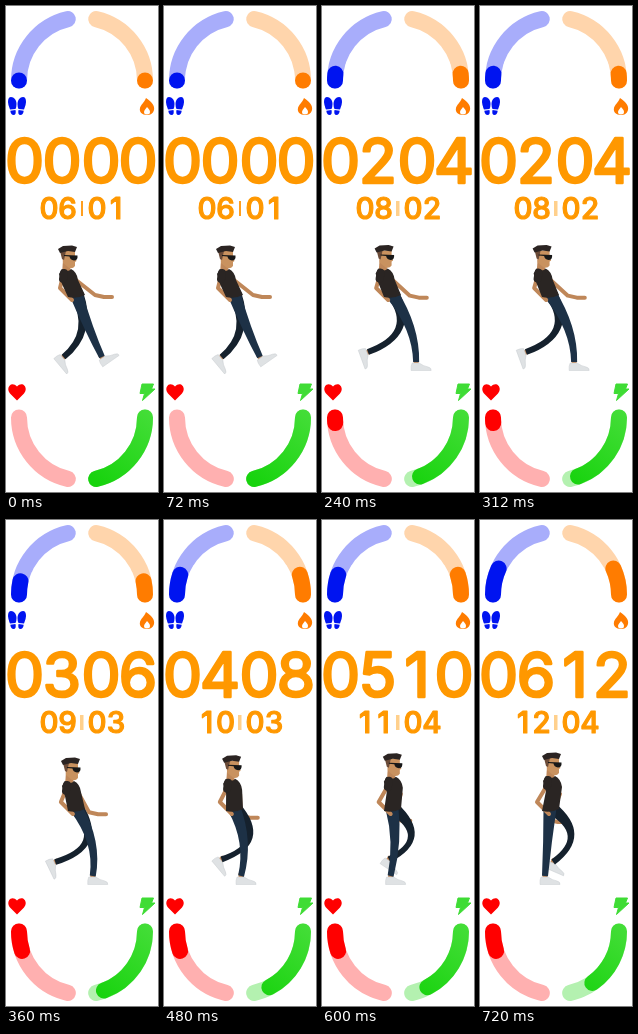
An HTML page for the animation above (840 ms loop, 152x486 px).

```html
<!DOCTYPE html>
<html lang="en">
<meta charset="utf-8">
<title>Walking watch face</title>
<style>
  html, body { margin: 0; width: 100%; height: 100%; overflow: hidden; background: #fff; }
  svg { display: block; }
  text { font-family: Inter, sans-serif; text-anchor: middle; fill: #ff9800; stroke: #ff9800; stroke-linejoin: round; }
  .big { font-size: 62px; font-weight: 400; stroke-width: 2.7px; }
  .small { font-size: 29.5px; font-weight: 500; stroke-width: 1.2px; }
  .arc, .line { fill: none; stroke-linecap: round; stroke-linejoin: round; }
  .arc { stroke-width: 16px; }
  .arm { stroke: #bf8759; stroke-width: 4px; }
  .shirt { fill: #2a2523; }
  .shoe { fill: #dfe2e4; stroke: #c8ccd0; stroke-width: .5px; }
</style>
<svg width="152" height="486" viewBox="0 0 152 486">
  <defs>
    <linearGradient id="green" gradientUnits="userSpaceOnUse" x1="147" y1="403" x2="90" y2="474">
      <stop stop-color="#46de3a"/><stop offset="1" stop-color="#18d30e"/>
    </linearGradient>
    <g id="shoe">
      <path fill="#bf8759" d="M-2.500-3H2.500V3H-2.500Z"/>
      <path class="shoe" d="M-4 1L3 1Q7 4 12 5Q15.500 6 15 8.500H-5Q-5.500 4-4 1Z"/>
    </g>
  </defs>
  <g id="arcs"></g>

  <g fill="#0014f0">
    <g id="foot">
      <path d="M5 91C8 91 10.500 94 10.500 98Q10.500 101 9.500 103L4 103.500Q2 99 2 96Q2 91 5 91Z"/>
      <path d="M4.300 104.700L9.500 104Q10.500 109 7.500 109Q5 109 4.300 104.700Z"/>
    </g>
    <use href="#foot" transform="matrix(-1 0 0 1 22 0)"/>
  </g>
  <path fill="#ff7c00" d="M140 92C146 96 149 100 148 104C147 108 144 109 141 109C136 109 133 106 134 102C134.500 99 138 97 140 92Z"/>
  <path fill="#fff" d="M141 101C143 103 144 104.500 144 106A3 2.500 0 0 1 138 106C138 104 140 103 141 101Z"/>
  <path fill="#f00" d="M11 394.500L4 387.500C-1 381 6 374.500 11 380.500C16 374.500 23 381 18 387.500Z"/>
  <path fill="#3fdc35" stroke="#3fdc35" stroke-linejoin="round" d="M136 378H147.500L145.500 383H149L136.500 394.500L138.500 387.500H134Z"/>

  <g id="digits"></g>
  <rect id="divider" y="195" height="15"/>

  <path id="farArm" class="line arm"/>
  <use id="farShoe" href="#shoe"/>
  <path id="farLeg" fill="#15212d"/>
  <use id="nearShoe" href="#shoe"/>
  <path id="nearLeg" fill="#1d3146"/>
  <path id="nearArm" class="line arm"/>
  <g id="head">
    <path fill="#bf8759" d="M-5 3L-6 17H3L2 9Z"/>
    <path fill="#c9925f" d="M-6-6L7-6V0L8.500 4L7 5V9Q5 12 1 11L-5 6Z"/>
    <path fill="#6b4b38" d="M-8-6H-2L-4 3L-6 2Z"/>
    <path fill="#2b2422" d="M-10-8L-5-11L4-11.500L9-10L7-5L0-6L-8-4Z"/>
    <path fill="#181818" d="M-4-2L9.500-1.500Q10 3.500 6 3.500Q2 3 1.500-.5L-4-1Z"/>
  </g>
  <path id="shirt" class="shirt"/>
  <path id="sleeve" class="line" stroke="#2a2523" stroke-width="8"/>
</svg>
<script>
const STEP = 120, STEPS = 7, SWEEP = 77;
const { PI, min, max, sin, cos, round, floor, ceil, hypot } = Math;
const $ = id => document.getElementById(id);
const set = (el, attrs) => { for (const k in attrs) el.setAttribute(k, attrs[k]); return el; };
const make = (parent, tag, attrs) =>
  set(parent.appendChild(document.createElementNS('http://www.w3.org/2000/svg', tag)), attrs);

// Quarter arcs start at the side of the dial and run towards its middle.
function arcPath(side, vertical, sweep) {
  const cy = vertical < 0 ? 74.5 : 411.5, a = sweep * PI / 180;
  const x = 76 + side * 63 * cos(a), y = cy + vertical * 63 * sin(a);
  return `M${76 + side * 63} ${cy}A63 63 0 0 ${side * vertical > 0 ? 1 : 0} ${x} ${y + .01}`;
}
const rising = i => round(i * .65) * 6.1;
const gauges = [
  [-1, -1, '#a8adfb', '#0014f0', rising],
  [1, -1, '#ffd5ac', '#ff7c00', rising],
  [-1, 1, '#ffb0b0', '#ff0000', i => i < 2 ? -1 : min(18, 5 + 13 * (i - 2))],
  [1, 1, '#b4f1b0', 'url(#green)', i => SWEEP - floor(i / 2) * 7.4]
].map(([side, vertical, pale, full, level]) => {
  make($('arcs'), 'path', { class: 'arc', stroke: pale, d: arcPath(side, vertical, SWEEP) });
  const bar = make($('arcs'), 'path', { class: 'arc', stroke: full });
  return i => set(bar, { d: level(i) < 0 ? '' : arcPath(side, vertical, level(i)) });
});

const row = (cls, y, xs) => xs.map(x => make($('digits'), 'text', { class: cls, x, y }));
const clock = row('big', 176.8, [18.5, 56, 95, 132]);
const date = row('small', 213.2, [43, 61.5, 91, 110]);
const pair = n => String(n).padStart(2, '0');
const write = (cells, a, b) => [...pair(a) + pair(b)].forEach((c, k) => cells[k].textContent = c);

// Tapered limb whose centre line passes through the joint.
function limb(hip, knee, ankle) {
  const bend = [0, 1].map(k => 2 * knee[k] - (hip[k] + ankle[k]) / 2);
  const edges = (p, from, to, width) => {
    const dx = to[0] - from[0], dy = to[1] - from[1], s = width / 2 / hypot(dx, dy);
    return [1, -1].map(d => `${p[0] - d * dy * s} ${p[1] + d * dx * s}`);
  };
  const h = edges(hip, hip, bend, 13), k = edges(bend, hip, ankle, 8), a = edges(ankle, bend, ankle, 6);
  return `M${h[0]}Q${k[0]} ${a[0]}L${a[1]}Q${k[1]} ${h[1]}Z`;
}
function leg(name, hip, knee, ankle, turn) {
  set($(name + 'Leg'), { d: limb(hip, knee, ankle) });
  set($(name + 'Shoe'), { transform: `translate(${ankle}) rotate(${turn})` });
}

// Half a stride: the weight shifts over the near leg while the far leg swings through.
function walk(i) {
  const t = max(0, (i - 1.3) / 4.7), shift = t * t * (3 - 2 * t);
  const heel = max(0, 1 - i / 1.2), swing = cos(PI * (i - 2) / 4.5);

  const ankleX = 96 - 31 * shift;
  leg('near', [70, 288], [(70 + ankleX) / 2 + 7 * sin(PI * i / 6), 322],
    [ankleX, 356 - 5 * heel], -35 * heel);
  leg('far', [71, 288], [76 + 15 * shift, 323 - 8 * shift],
    [60 - 14 * swing, 345 + 6 * cos(PI * i / 4.5)], 46 + 24 * swing);

  const x = 62 + 10 * shift, y = 251 - 7 * shift, top = y + 15;
  set($('head'), { transform: `translate(${x} ${y})` });
  set($('shirt'), { d: `M${x - 6} ${top - 3}Q${x} ${top + 1} ${x + 3} ${top - 3}Q${x + 9} ${top} ${x + 10} ${top + 8}L79 289Q71 293 62 291L${x - 6} ${top + 12}L${x - 9} ${top + 2}Z` });
  set($('sleeve'), { d: `M${x - 4} ${top + 1}L${x - 5} ${top + 7}` });

  const handX = 106 - 20 * shift, handY = 291 + 11 * shift, elbowX = 54 + 3 * shift;
  set($('farArm'), { d: `M${x + 8} 274L${handX - 17} ${handY - 2}L${handX - 8} ${handY}H${handX}` });
  set($('nearArm'), { d: `M${x - 6} ${top + 8}L${elbowX} 282L${elbowX + 12} 294` });
}

function draw() {
  const i = floor(performance.now() / STEP) % STEPS;
  gauges.forEach(update => update(i));
  write(clock, i, 2 * i);
  write(date, 6 + i, 1 + ceil(i / 2));
  set($('divider'), i < 2 ? { x: 75, width: 2, fill: '#ff9f20' } : { x: 74, width: 3.5, fill: '#ffd08c' });
  walk(i);
  requestAnimationFrame(draw);
}
draw();
</script>
</html>
```
